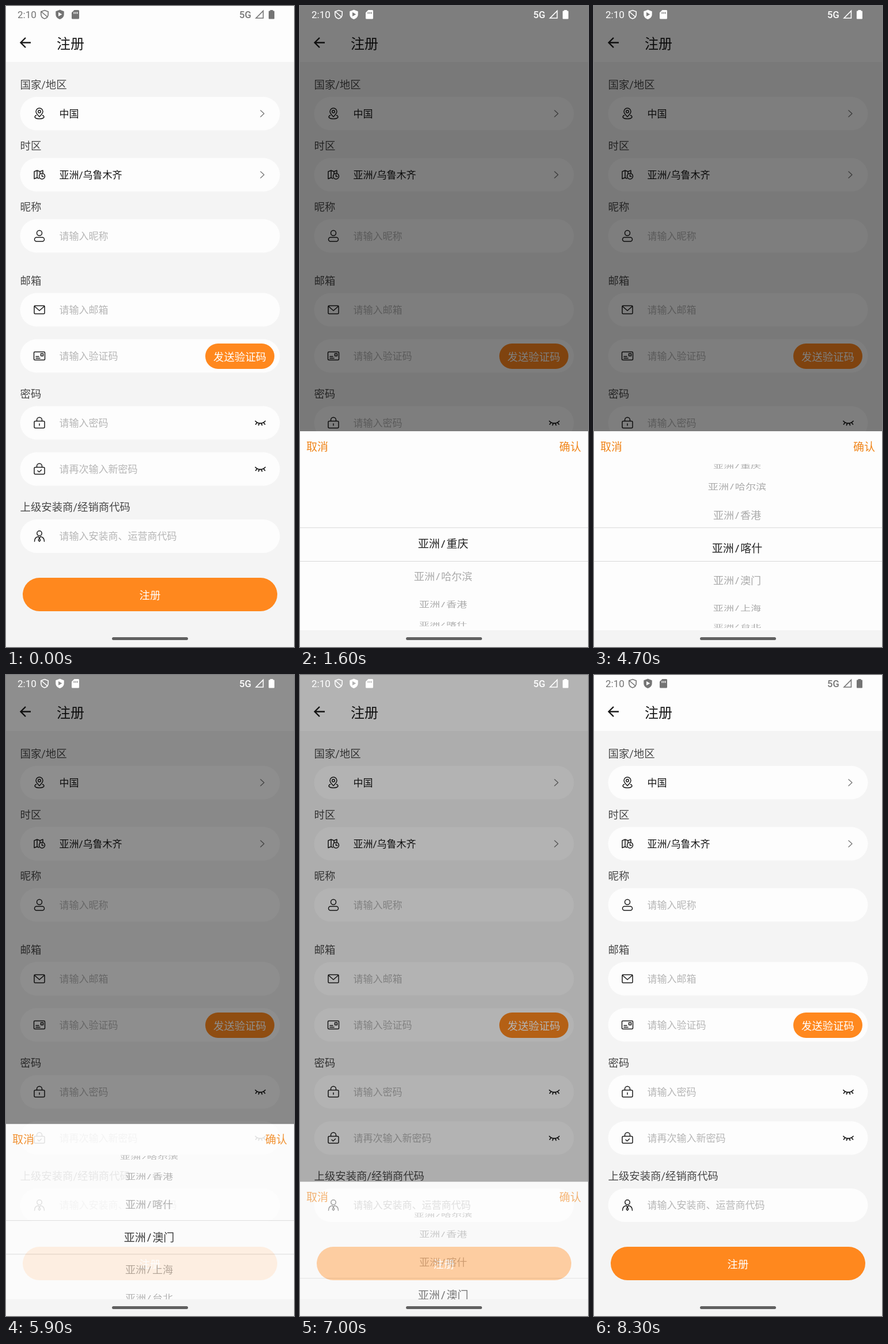
These frames come from a looping animation (500 px wide and 1111 px high, 8.4 s). An HTML page:

```html
<!DOCTYPE html>
<html lang="zh-CN">
<head>
<meta charset="utf-8">
<style>
  html, body { margin: 0; width: 100%; height: 100%; overflow: hidden; background: #f4f4f4; }
  svg { display: block; width: 100vw; height: 100vh; }
  text { font-family: Roboto, "Noto Sans CJK SC", "Noto Sans CJK", sans-serif; }
  #wheel text { font-family: "Noto Sans Mono", "Noto Sans CJK SC", "Noto Sans CJK", monospace; }
  .icon { fill: none; stroke: #1c1c1c; stroke-width: 1.5; stroke-linecap: round; stroke-linejoin: round; }
</style>
</head>
<body>
<svg id="stage" viewBox="0 0 500 1111">
  <defs>
    <clipPath id="screen"><rect width="500" height="1082"/></clipPath>
    <clipPath id="drum"><rect y="784" width="500" height="298"/></clipPath>
    <clipPath id="band"><rect y="904" width="500" height="58.5"/></clipPath>
  </defs>
  <rect width="500" height="1111" fill="#f4f4f4"/>
  <rect width="500" height="97" fill="#fdfdfd"/>
  <path class="icon" d="M43 63.500H26M34 55L25.500 63.500L34 72" style="stroke-width:2.4;stroke-linecap:butt;stroke-linejoin:miter"/>
  <g id="form"></g>
  <rect id="dim" width="500" fill="#000"/>
  <g clip-path="url(#screen)">
    <g id="sheet">
      <rect y="737" width="500" height="345" fill="#fdfdfd"/>
      <g id="wheel">
        <g id="outer" clip-path="url(#drum)" fill="#a9a9a9"></g>
        <rect y="904" width="500" height="58.500" fill="#fdfdfd"/>
        <g id="inner" clip-path="url(#band)" fill="#222"></g>
      </g>
      <path d="M0 904.200H500M0 962.500H500" stroke="#d8d8d8"/>
    </g>
  </g>
  <g id="status">
    <g fill="none" stroke="currentColor" stroke-width="1.600">
      <path d="M67 7.500L73.200 9.800V14.500C73.200 18 70.500 21 67 22C63.500 21 60.800 18 60.800 14.500V9.800ZM61 9.500L72.500 19.500"/>
      <path d="M434 21L446.500 8.500V21Z"/>
    </g>
    <g fill="currentColor">
      <path fill-rule="evenodd" d="M93.500 6.500L100.700 9.200V14.500C100.700 18.500 97.500 22 93.500 23C89.500 22 86.300 18.500 86.300 14.500V9.200ZM91 10.800V18L97.300 14.400Z"/>
      <path fill-rule="evenodd" d="M118.500 7H125.500Q127 7 127 8.500V21Q127 22.500 125.500 22.500H115.500Q114 22.500 114 21V11.500ZM117.500 10.500V13.500H119V10.500ZM120.300 10.500V13.500H121.800V10.500ZM123 10.500V13.500H124.500V10.500Z"/>
      <path d="M458.500 8.500V7H463.500V8.500H465Q466 8.500 466 9.500V21.500Q466 22.500 465 22.500H457Q456 22.500 456 21.500V9.500Q456 8.500 457 8.500Z"/>
    </g>
  </g>
  <rect y="1082" width="500" height="29" fill="#f4f4f4"/>
  <rect x="184" y="1094" width="132" height="5" rx="2.500" fill="#606060"/>
</svg>
<script>
const LOOP = 8400, ORANGE = '#ff881e';
const $ = id => document.getElementById(id);

function add(parent, tag, attrs, content) {
  const el = document.createElementNS('http://www.w3.org/2000/svg', tag);
  for (const key in attrs) el.setAttribute(key, attrs[key]);
  if (content) el.textContent = content;
  return parent.appendChild(el);
}

// Text whose ideographs are vertically centred on y.
function write(parent, content, x, y, size, fill, extra = {}) {
  return add(parent, 'text', { x, y: y + size * 0.38, 'font-size': size, fill, ...extra }, content);
}

const middle = { 'text-anchor': 'middle' };
const form = $('form');

// Icon paths are relative to the centre of the icon.
const icons = {
  pin: 'M0 5.500C-3.500 2 -6 -0.500 -6 -3.500A6 6 0 0 1 6 -3.500C6 -0.500 3.500 2 0 5.500ZM-2.300 -3.500A2.300 2.300 0 1 0 2.300 -3.500A2.300 2.300 0 1 0 -2.300 -3.500M-5.500 3C-10 5 -8.500 9 0 9S10 5 5.500 3',
  map: 'M-1 6.500L-4 5L-9 7V-5.500L-4 -7.500L1 -5.500L6 -7.500V-3M-4 -7.500V5M1 -5.500V-1M-0.500 2.500A5 5 0 1 0 9.500 2.500A5 5 0 1 0 -0.500 2.500M4.500 -0.500V3H7',
  user: 'M-4.500 -5A4.500 4.500 0 1 0 4.500 -5A4.500 4.500 0 1 0 -4.500 -5M-5 2.500H5A3.500 3.500 0 0 1 5 9.500H-5A3.500 3.500 0 0 1 -5 2.500Z',
  mail: 'M-7.500 -7H7.500Q9 -7 9 -5.500V5.500Q9 7 7.500 7H-7.500Q-9 7 -9 5.500V-5.500Q-9 -7 -7.500 -7ZM-8.500 -6L0 1.500L8.500 -6',
  card: 'M-8 -7H8Q9.500 -7 9.500 -5.500V5.500Q9.500 7 8 7H-8Q-9.500 7 -9.500 5.500V-5.500Q-9.500 -7 -8 -7ZM2.500 -4H6.500V0H2.500ZM-6 1H-1M-6 4H1',
  lock: 'M-7 -3H7Q9 -3 9 -1V7Q9 9 7 9H-7Q-9 9 -9 7V-1Q-9 -3 -7 -3ZM-4.500 -3V-5A4.500 4.500 0 0 1 4.500 -5V-3',
  agent: 'M-4.200 -5A4.200 4.200 0 1 0 4.200 -5A4.200 4.200 0 1 0 -4.200 -5M-8.500 9C-8.500 4 -6 1.500 -2 0.800L0 3L2 0.800C6 1.500 8.500 4 8.500 9M0 3L-1.800 7L0 9L1.800 7Z',
  chevron: 'M-3 -5.500L3 0L-3 5.500',
  eye: 'M-8.500 -3C-4 2 4 2 8.500 -3M-5.500 -0.500L-8 2.500M-2 1L-3 4M2 1L3 4M5.500 -0.500L8 2.500'
};
icons.lockKey = icons.lock + 'M0 1.500V4.500';
icons.lockCheck = icons.lock + 'M-3 3L-0.500 5.300L3.500 1.500';

function icon(name, x, y, style = '') {
  add(form, 'path', { class: 'icon', d: icons[name], transform: `translate(${x} ${y})`, style });
}

function field(y, iconName, content, filled, tail) {
  add(form, 'rect', { x: 24.5, y: y - 29, width: 451, height: 58, rx: 29, fill: '#fdfdfd' });
  icon(iconName, 58, y);
  write(form, content, 92.5, y, 17, filled ? '#151515' : '#b6b6b6');
  if (tail === 'chevron') icon(tail, 445, y, 'stroke:#777;stroke-width:1.3');
  if (tail === 'eye') icon(tail, 441.5, y, 'stroke-width:1.8');
}

write(form, '注册', 88, 65, 24, '#151515', { 'font-weight': 500 });
[['国家/地区', 136], ['时区', 242], ['昵称', 348], ['邮箱', 476], ['密码', 672], ['上级安装商/经销商代码', 868.5]]
  .forEach(([label, y]) => write(form, label, 24.5, y, 18.4, '#484848'));
field(186.5, 'pin', '中国', true, 'chevron');
field(292.5, 'map', '亚洲/乌鲁木齐', true, 'chevron');
field(398.5, 'user', '请输入昵称');
field(526.5, 'mail', '请输入邮箱');
field(606.5, 'card', '请输入验证码');
field(722.5, 'lockKey', '请输入密码', false, 'eye');
field(802.5, 'lockCheck', '请再次输入新密码', false, 'eye');
field(919, 'agent', '请输入安装商、运营商代码');
add(form, 'rect', { x: 346, y: 585, width: 120, height: 44, rx: 22, fill: ORANGE });
write(form, '发送验证码', 406, 608, 18.4, '#fff', middle);
add(form, 'rect', { x: 29, y: 991, width: 442, height: 58, rx: 29, fill: ORANGE });
write(form, '注册', 250, 1021, 18.4, '#fff', { ...middle, 'font-weight': 500 });

write($('status'), '2:10', 20, 14.3, 17, 'currentColor');
write($('status'), '5G', 405, 14.3, 16.5, 'currentColor', { 'font-weight': 500 });

write($('sheet'), '取消', 11, 763.5, 19, '#f08418');
write($('sheet'), '确认', 450, 763.5, 19, '#f08418');

const cities = ['重庆', '哈尔滨', '香港', '喀什', '澳门', '上海', '台北', '乌鲁木齐'];
const wheelItems = cities.map(city => [['outer', 18.1], ['inner', 19]].map(([layer, size]) =>
  write($(layer), '亚洲/' + city, 248.5, 0, size, 'inherit', middle)));

const linear = x => x;
const easeOut = x => 1 - (1 - x) * (1 - x);

// Each key: [start, end, value at end, easing]; the value holds in between.
function track(t, value, keys) {
  for (const [start, end, next, ease] of keys) {
    if (t < start) break;
    value += (next - value) * ease(Math.min(1, (t - start) / (end - start)));
  }
  return value;
}

const openKeys = [
  [925, 1225, 1, linear], [5865, 6165, 0, linear],
  [6824, 7124, 1, linear], [7925, 8225, 0, linear]
];
const scrollKeys = [
  [1600, 2320, 6, easeOut], [2460, 3140, 1, easeOut],
  [3800, 4700, 2.88, linear], [4700, 5300, 4, x => Math.sin(x * Math.PI / 2)]
];

function placeWheel(position) {
  const radius = 152.7, step = 0.379;
  wheelItems.forEach((layers, i) => {
    const angle = (i - position) * step;
    const visible = Math.abs(angle) < Math.PI / 2;
    for (const el of layers) {
      el.style.display = visible ? '' : 'none';
      el.setAttribute('transform', `translate(0 ${933 + radius * Math.sin(angle)}) scale(1 ${Math.cos(angle)})`);
    }
  });
}

function draw(now) {
  const t = now % LOOP;
  const open = track(t, 0, openKeys);
  const drop = 345 * (1 - open);
  $('dim').setAttribute('height', 737 + drop);
  $('dim').setAttribute('opacity', open / 2);
  $('sheet').setAttribute('transform', `translate(0 ${drop})`);
  $('sheet').setAttribute('opacity', open);
  $('status').style.color = open > 0 ? '#fff' : '#747474';
  placeWheel(track(t, 0, scrollKeys));
}

const begin = performance.now();
function tick() {
  draw(performance.now() - begin);
  requestAnimationFrame(tick);
}
tick();
</script>
</body>
</html>
```
